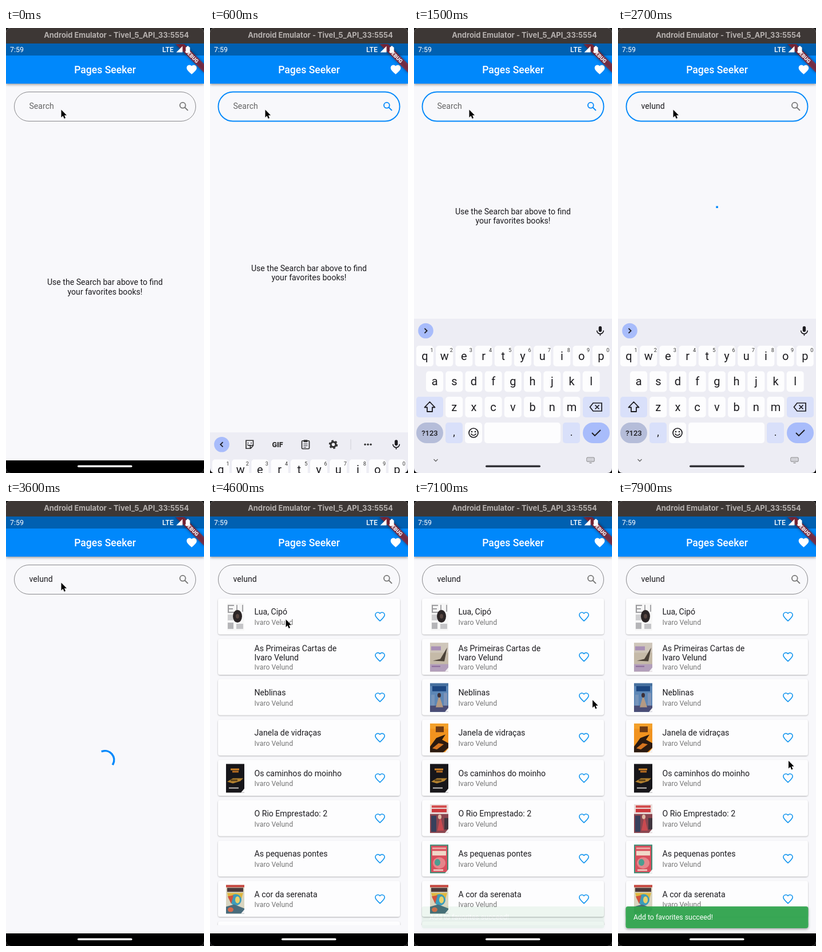
An HTML page for the animation above (8 s loop, 346 by 776 pixels).

```html
<!DOCTYPE html>
<html lang="en">
<head>
<meta charset="utf-8">
<title>Book search app</title>
<style>
html, body { margin: 0; height: 100%; overflow: hidden; background: #111; }
svg { display: block; width: 100vw; height: 100vh; }
text { font-family: Roboto, sans-serif; }
</style>
</head>
<body>
<svg id="stage" viewBox="0 0 346 776" xmlns="http://www.w3.org/2000/svg"></svg>
<script>
const LOOP = 8000, BLUE = '#0288fb', INK = '#1c1b1f', QUERY = 'velund', AUTHOR = 'Ivaro Velund';
const ROW_Y = 201.6, PITCH = 70.35;
const KB_TOP = 507, KB_H = 269, NAV_TOP = 754;

const TYPED_AT = [1700, 1850, 2000, 2100, 2250, 2400];
const COVER_AT = [4300, 5000, 4800, 5200, 4400, 5100, 4900, 4500];
const LIST_AT = 4000, SUBMIT_AT = 2500, SPIN_AT = 2700;

// time, x, y of the pointer tip
const POINTER = [
  [0, 96.5, 142.5], [3850, 96.5, 142.5], [4400, 132.5, 206.5], [4700, 132.5, 206.5],
  [5300, 190, 381], [5400, 190, 381], [5800, 294.5, 333], [6050, 294.5, 333],
  [6650, 312, 347], [7420, 312, 347], [7860, 298, 453], [8000, 298, 453]
];

const HEART = 'M12 21.35l-1.45-1.32C5.4 15.36 2 12.28 2 8.5 2 5.42 4.42 3 7.5 3c1.74 0 3.41.81 4.5 2.09C13.09 3.81 14.76 3 16.5 3 19.58 3 22 5.42 22 8.5c0 3.78-3.4 6.86-8.55 11.54z';

const BOOKS = [
  ['Lua, Cipó'], ['As Primeiras Cartas de', AUTHOR], ['Neblinas'], ['Janela de vidraças'],
  ['Os caminhos do moinho'], ['O Rio Emprestado: 2'], ['As pequenas pontes'], ['A cor da serenata']
];

const rect = (x, y, w, h, fill, r = 0, more = '') =>
  `<rect x="${x}" y="${y}" width="${w}" height="${h}" rx="${r}" fill="${fill}" ${more}/>`;
const text = (s, x, y, size, fill = INK, more = '') =>
  `<text x="${x}" y="${y}" font-size="${size}" fill="${fill}" ${more}>${s}</text>`;
const shape = (d, fill, more = '') => `<path d="${d}" fill="${fill}" ${more}/>`;
const line = (d, color, w, more = '') =>
  `<path d="${d}" fill="none" stroke="${color}" stroke-width="${w}" ${more}/>`;
const oval = (x, y, rx, ry, fill) => `<ellipse cx="${x}" cy="${y}" rx="${rx}" ry="${ry}" fill="${fill}"/>`;
const at = (x, y, body, scale = 1) => `<g transform="translate(${x} ${y}) scale(${scale})">${body}</g>`;
const MID = 'text-anchor="middle"';

// Covers are flat shapes in a 32 x 50 box
const CURL = shape('M32 43L26 50H32z', '#f3f2f3');
const COVERS = [
  rect(2, 1, 30, 48, '#f7f7f7') + rect(3, 4, 11, 2, '#9b9b9e') + rect(3, 10, 9, 2, '#9b9b9e') +
    rect(3, 16, 11, 2, '#9b9b9e') + rect(3, 4, 2, 13, '#9b9b9e') + rect(18, 4, 2, 12, '#a5a5a8') +
    rect(28, 4, 2, 12, '#a5a5a8') + rect(3, 21, 10, 10, '#cfcfd1') + rect(3, 35, 10, 11, '#b5b5b8') +
    rect(18, 37, 12, 9, '#c5c5c8') + oval(20, 24, 8, 11, '#2b2526') + oval(20, 24, 3, 4, '#564540'),
  rect(0, 0, 32, 50, '#c5baa8') + rect(0, 0, 32, 17, '#cfc6ba') + rect(2, 6, 17, 7, '#a890b5') +
    shape('M30 8L18 28 5 31 25 32z', '#4b4238') + rect(0, 37, 32, 13, '#b39fbb') +
    rect(3, 40, 15, 2, '#8b6a9c') + CURL,
  rect(0, 0, 32, 50, '#5d87b6') + rect(0, 0, 32, 5, '#47719f') + rect(4, 5, 24, 9, '#1c4680') +
    rect(2, 20, 6, 20, '#7795bb') + rect(24, 17, 6, 23, '#7f94b8') + rect(0, 39, 32, 11, '#4a4d76') +
    shape('M16 21L10 42H23z', '#b49a83') + oval(16, 21, 3, 4, '#3c3038') + CURL,
  rect(0, 0, 32, 50, '#f1931f') + rect(0, 0, 32, 9, '#f3a02a') + rect(10, 5, 14, 10, '#6d3a14') +
    shape('M0 40L11 25 27 19 21 28 32 34V42L23 50H0z', '#2b1a10') + shape('M4 43L15 34 24 36 12 45z', '#d7751f') + CURL,
  rect(0, 0, 32, 50, '#17161a') + rect(8, 8, 15, 3, '#d08328') + rect(11, 12, 11, 3, '#b96d20') +
    shape('M2 31L12 25 30 25 25 30 12 34z', '#b5832f') + rect(8, 27, 12, 3, '#5d421a') +
    rect(5, 41, 17, 2, '#c5c2bd') + CURL,
  rect(0, 0, 32, 50, '#e9dddb') + rect(3, 2, 26, 4, '#d34c4d') + rect(3, 8, 26, 6, '#cd383c') +
    rect(0, 17, 32, 33, '#8a4650') + rect(2, 20, 9, 28, '#38405c') + shape('M18 20L13 46H24z', '#c94a50') +
    oval(17, 22, 3, 4, '#e0b9a4') + rect(25, 24, 7, 20, '#40363f') + CURL,
  rect(0, 0, 32, 50, '#3d8f78') + rect(2, 2, 28, 46, '#d94e5c') + rect(4, 5, 24, 3, '#e9a9a2') +
    rect(4, 11, 24, 8, '#f0d8c8') + oval(16, 32, 11, 10, '#e5858a') + oval(13, 31, 5, 6, '#4b9d90') +
    rect(6, 43, 17, 3, '#eec2ba') + CURL,
  rect(0, 0, 32, 50, '#d9d5c0') + rect(0, 0, 32, 4, '#c5453e') + rect(2, 5, 28, 7, '#4b3a3b') +
    shape('M2 14H30L27 24 5 25z', '#dfb73f') + oval(17, 26, 10, 10, '#3d9cba') + shape('M3 20L13 18 9 33z', '#d2523c') +
    oval(20, 26, 4, 6, '#e9d16a') + shape('M0 38L14 34 32 41V50H0z', '#496c7c') + oval(8, 43, 5, 4, '#d9694a') + CURL
];

const heartLine = (x, y) =>
  at(x, y, `<g transform="translate(-12 -12)">${line(HEART + 'M12 20z', '#1295ef', 2)}</g>`, 0.81);

function card(book, i) {
  const c = ROW_Y + i * PITCH, two = book.length > 1;
  const first = two ? c - 10 : c - 3.3;
  return rect(14, c - 31.5, 318, 62.5, '#fdfdfe', 4, 'filter="url(#lift)"') +
    `<g id="cover${i}">${at(28, c - 24.5, COVERS[i])}</g>` +
    book.map((s, k) => text(s, 77.5, first + k * 16.4, 14.1)).join('') +
    text(AUTHOR, 77.5, two ? c + 21.6 : c + 14.4, 12.3, '#757575') + heartLine(297, c);
}

function keyboard() {
  const key = (x, y, w, fill = '#fdfdfe', r = 5) => rect(x, y - 18, w, 36, fill, r);
  const soft = '#d9e0fa', strong = '#a8bcfb';
  let s = rect(0, 0, 346, KB_H + 4, '#ededf4');
  const letters = (row, x0, y) => [...row].forEach((ch, i) => {
    const x = x0 + i * 34.2;
    s += key(x - 15, y, 30) + text(ch, x, y + 6.6, 20, INK, MID);
    if (row.length === 10) s += text((i + 1) % 10, x + 12, y - 7.5, 9, '#333', MID);
  });
  letters('qwertyuiop', 19, 65);
  letters('asdfghjkl', 36.1, 109.5);
  letters('zxcvbnm', 70.2, 154);

  s += key(4, 154, 47, soft) + line('M27.5 145L18.5 154.5H23V162H32V154.5H36.5Z', INK, 1.8, 'stroke-linejoin="round"');
  s += key(295, 154, 47, soft) + line('M313 147H328V161H313L307.5 154ZM316.5 150.5L323.5 157.5M323.5 150.5L316.5 157.5', INK, 1.7);
  s += key(4, 199, 47, '#b5bdd9', 18) + text('?123', 27.5, 203.8, 13, INK, MID + ' font-weight="500"');
  s += key(55, 199, 30, soft) + text(',', 70, 204, 18, INK, MID);
  s += key(89, 199, 30) + `<circle cx="104" cy="199" r="8" fill="none" stroke="${INK}" stroke-width="1.7"/>` +
    oval(101, 197, 1.3, 1.3, INK) + oval(107, 197, 1.3, 1.3, INK) + line('M99.5 200.5Q104 206.5 108.5 200.5', INK, 1.6);
  s += key(123, 199, 133) + key(260, 199, 30, soft) + text('.', 275, 204, 18, INK, MID);
  s += key(295, 199, 47, strong, 18) + line('M311 199L316 204L326 194', INK, 1.9);

  // Toolbar
  s += oval(20.5, 21, 13.3, 13.3, strong) + at(20.5, 21, `<g id="arrow">${line('M2-4.2L-2.2 0L2 4.2', INK, 1.8)}</g>`);
  s += '<g id="tools">' +
    line('M63 14H75.5V23L71 28H63ZM75.5 22.5H70.5V28M65.5 21Q67.5 24 70 22', '#333', 1.7) +
    oval(66.5, 18.5, 1, 1, '#333') + oval(72, 18.5, 1, 1, '#333') +
    text('GIF', 118, 25.5, 12.5, '#333', MID + ' font-weight="900"') +
    rect(160.5, 14.5, 13, 14, 'none', 1.5, 'stroke="#333" stroke-width="1.7"') + rect(163.5, 13, 7, 4, '#333', 1) +
    line('M163.5 20H170.5M163.5 23H170.5M163.5 26H168', '#333', 1.2) +
    `<circle cx="215.5" cy="21" r="4.4" fill="none" stroke="#333" stroke-width="3.2"/>` +
    `<circle cx="215.5" cy="21" r="6.6" fill="none" stroke="#333" stroke-width="2.4" stroke-dasharray="3.5 3.41"/>` +
    line('M246 12V30', '#cfcfd6', 1) + [271, 276, 281].map(x => oval(x, 21, 1.7, 1.7, '#333')).join('') + '</g>';
  s += rect(322.7, 13, 5.4, 10, INK, 2.7) + line('M319.6 20.5A5.8 5.8 0 0 0 331.2 20.5M325.4 26V29.5', INK, 1.7);

  // Gesture strip
  s += line('M34.5 245L38 248.5L41.5 245', '#666', 1.3) + rect(302, 242, 13, 7, 'none', 1, 'stroke="#777" stroke-width="1"') +
    line('M304 244.5H313.5M304 247H313.5', '#777', 1.1, 'stroke-dasharray="1.2 1"') + line('M306.5 251.5H310.5', '#777', 1) +
    rect(125, 255.5, 96, 3.4, '#333338', 1.7);
  return s;
}

const LENS = '<circle cx="-2.2" cy="-2.2" r="4.9" fill="none" stroke-width="1.8"/><path d="M1.4 1.4L6.9 6.9" stroke-width="2"/>';

document.getElementById('stage').innerHTML = `
<defs>
  <clipPath id="window">${rect(0, 0, 346, 776, '#000', 8)}</clipPath>
  <clipPath id="listBox">${rect(0, 163, 346, 576.5, '#000')}</clipPath>
  <clipPath id="app">${rect(0, 28, 346, 748, '#000')}</clipPath>
  <filter id="lift" x="-5%" y="-20%" width="110%" height="150%"><feDropShadow dx="0" dy="1" stdDeviation="0.9" flood-opacity=".3"/></filter>
  <filter id="drop" x="-5%" y="-20%" width="110%" height="160%"><feDropShadow dx="0" dy="2" stdDeviation="2" flood-opacity=".36"/></filter>
  <filter id="haze" x="-20%" y="-100%" width="140%" height="300%"><feGaussianBlur stdDeviation="2.6"/></filter>
</defs>
<g clip-path="url(#window)">
  ${rect(0, 0, 346, 776, '#f8f8fb')}
  <g id="list" clip-path="url(#listBox)">${BOOKS.map(card).join('')}
    ${rect(14, ROW_Y + 8 * PITCH - 31.5, 318, 62.5, '#fdfdfe', 4, 'filter="url(#lift)"')}</g>
  <g id="tip">${text('Use the Search bar above to find', 173, -3.3, 14.1, INK, MID)}
    ${text('your favorites books!', 173, 13.3, 14.1, INK, MID)}</g>
  <path id="spinner" fill="none" stroke="${BLUE}" stroke-width="3.5" stroke-linecap="square"/>
  <rect id="field" x="14.5" y="111.5" width="317" height="51" rx="25.5" fill="none"/>
  <text id="entry" x="40.5" y="141" font-size="14.1"></text>
  <g id="lens" transform="translate(311 137)">${LENS}</g>
  ${rect(0, 40, 346, 57, BLUE, 0, 'filter="url(#drop)"')}
  ${rect(0, 27, 346, 21, '#0060b1')}
  ${rect(0, 0, 346, 27, '#3d3735')}
  ${text('Android Emulator - Tivel_5_API_33:5554', 193, 17.3, 12.9, '#b6b1af', MID + ' font-weight="700" style="font-family:Inter,sans-serif"')}
  ${text('Pages Seeker', 173, 79.3, 17.6, '#fff', MID + ' font-weight="500"')}
  ${at(324.5, 72.5, `<g transform="translate(-12 -12)">${shape(HEART, '#fff')}</g>`, 0.88)}
  <g clip-path="url(#app)"><g transform="translate(346 28) rotate(45)">
    ${rect(-36, 24.6, 72, 10.6, '#000', 0, 'fill-opacity=".5" filter="url(#haze)"')}
    ${rect(-36, 24.6, 72, 10.6, '#b71c1c', 0, 'fill-opacity=".63"')}
    ${text('DEBUG', 0, 33.1, 9, '#fff', MID + ' font-weight="900"')}
  </g></g>
  ${text('7:59', 7, 42.3, 12.4, '#fff')}
  ${text('LTE', 273, 41.8, 12.3, '#fff', 'font-weight="500"')}
  ${shape('M308.5 31.5V42.5H297.5z', '#fff')}
  ${rect(314, 33, 7.5, 10, '#fff', 1.5)}${rect(316, 31.5, 3.5, 2.5, '#fff')}
  ${rect(0, NAV_TOP, 346, 22, '#000')}${rect(125, 762.5, 95.5, 3.6, '#fff', 1.8)}
  <g id="keyboard">${keyboard()}</g>
  <g id="snack">${rect(13.5, 707, 319, 38, '#30a54f', 4, 'fill-opacity=".93" filter="url(#drop)"')}
    ${text('Add to favorites succeed!', 27, 730.3, 12.3, '#fff')}</g>
  <g id="pointer">${shape('M0 0V13.4L3.1 10.6 5.2 15.5 7.5 14.5 5.4 9.8H9.6z', '#000', 'stroke="#fff" stroke-width=".9" paint-order="stroke"')}</g>
</g>`;

const $ = id => document.getElementById(id);
const set = (id, name, v) => $(id).setAttribute(name, v);
const show = (id, on) => set(id, 'visibility', on ? 'visible' : 'hidden');
const ramp = (t, a, b) => Math.min(1, Math.max(0, (t - a) / (b - a)));
const smooth = x => x * x * (3 - 2 * x);
const mix = (a, b, k) => a + (b - a) * k;

// cubic-bezier(.4, 0, .2, 1)
function standardEase(x) {
  let lo = 0, hi = 1;
  for (let i = 0; i < 22; i++) {
    const u = (lo + hi) / 2, v = 1 - u;
    if (1.2 * v * v * u + 0.6 * v * u * u + u ** 3 < x) lo = u; else hi = u;
  }
  return lo * lo * (3 - 2 * lo);
}

function arc(ms, cy) {
  const phase = ms % 1333 / 1333, R = 15.8, PI = Math.PI;
  const head = standardEase(ramp(phase, 0, 0.5)), tail = standardEase(ramp(phase, 0.5, 1));
  const a = -PI / 2 + tail * 1.5 * PI + ms / 2222 * 2 * PI + phase * PI / 2;
  const sweep = Math.max((head - tail) * 1.5 * PI, 0.004);
  const p = q => `${173 + R * Math.cos(q)} ${cy + R * Math.sin(q)}`;
  return `M${p(a)}A${R} ${R} 0 ${sweep > PI ? 1 : 0} 1 ${p(a + sweep)}`;
}

function pointerAt(t) {
  const i = Math.max(1, POINTER.findIndex(p => p[0] > t));
  const [t0, x0, y0] = POINTER[i - 1], [t1, x1, y1] = POINTER[i];
  const k = smooth(ramp(t, t0, t1));
  return `translate(${mix(x0, x1, k)} ${mix(y0, y1, k)})`;
}

function render(t) {
  const rise = 1 - (1 - ramp(t, 560, 984)) ** 3;
  const up = rise * (1 - smooth(ramp(t, 2750, 3100)));
  const top = KB_TOP + KB_H * (1 - up);
  const middle = (163 + Math.min(NAV_TOP, top) - 14) / 2;
  set('keyboard', 'transform', `translate(0 ${top})`);
  show('keyboard', up > 0);
  const fold = smooth(ramp(t, 1200, 1400));
  set('arrow', 'transform', `rotate(${180 * fold})`);
  set('tools', 'opacity', 1 - ramp(t, 1250, 1500));

  const focus = ramp(t, 80, 280) * (1 - ramp(t, 2700, 2900));
  const tone = [[136, 2], [136, 136], [139, 251]].map(([a, b]) => Math.round(mix(a, b, focus)));
  set('field', 'stroke', `rgb(${tone})`);
  set('field', 'stroke-width', mix(1, 1.9, focus));
  set('lens', 'stroke', t >= 100 && t < SUBMIT_AT ? BLUE : '#777');
  const n = TYPED_AT.filter(k => t >= k).length;
  $('entry').textContent = n ? QUERY.slice(0, n) : 'Search';
  set('entry', 'fill', n ? INK : '#666');

  show('tip', t < SUBMIT_AT);
  set('tip', 'transform', `translate(0 ${middle})`);
  show('spinner', t >= SUBMIT_AT && t < LIST_AT);
  set('spinner', 'd', arc(Math.max(0, t - SPIN_AT), middle));

  set('list', 'display', t >= LIST_AT ? 'inline' : 'none');
  COVER_AT.forEach((k, i) => set('cover' + i, 'opacity', t >= k ? 1 : 0));
  set('snack', 'opacity', smooth(ramp(t, 7060, 7300)));
  set('pointer', 'transform', pointerAt(t));
}

const start = performance.now();
function tick() {
  render((performance.now() - start) % LOOP);
  requestAnimationFrame(tick);
}
tick();
</script>
</body>
</html>
```
